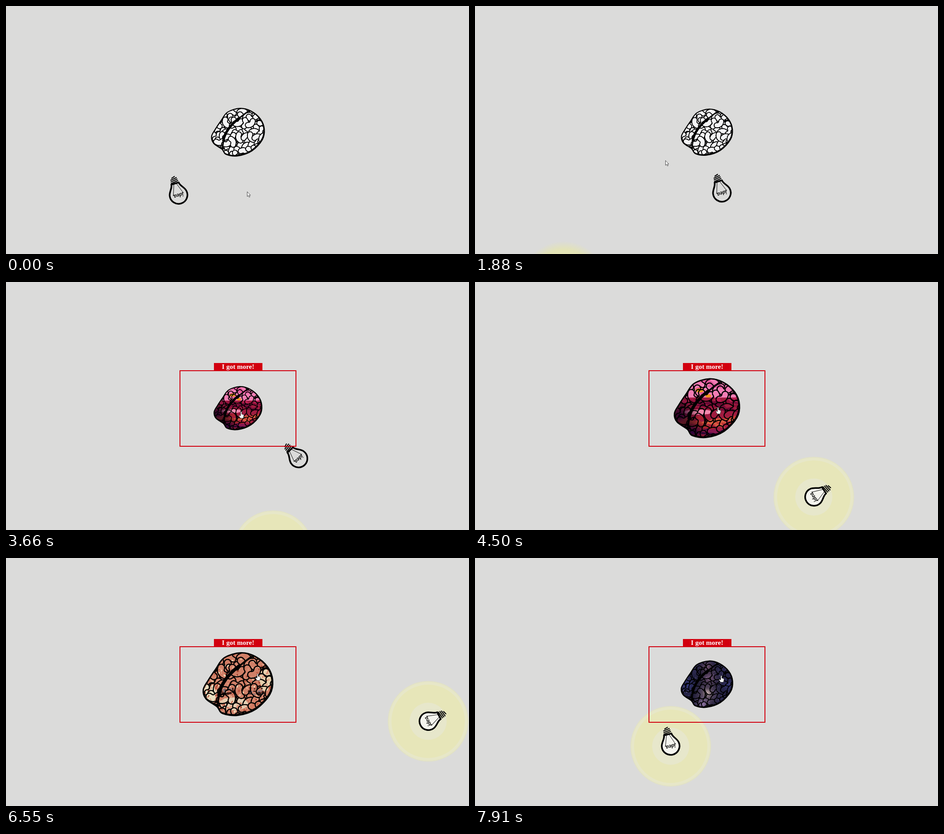
An HTML page with a canvas that plays this animation: 1022x548 px, repeating every 8000 ms.

```html
<!DOCTYPE html>
<html lang="en">
<head>
<meta charset="utf-8">
<title>Brain and ideas</title>
<style>
html, body { margin: 0; width: 100%; height: 100%; overflow: hidden; background: #dbdbda; }
canvas { display: block; }
</style>
</head>
<body>
<canvas id="stage" width="1022" height="548"></canvas>
<script>
const LOOP = 8000, BEAT = 2000, PEAK = 555, CX = 512, CY = 279;
const RED = '#d2000f', BG = '#dbdbda';
const ctx = document.getElementById('stage').getContext('2d');

// One bulb leaves the brain at each peak; velocity in px/ms, lit = age when it lights up
const BULBS = [
  { born: -1330, vx: -0.0984, vy: 0.1045, lit: 1900 },
  { born: PEAK, vx: 0.025, vy: 0.1013, lit: 1800 },
  { born: PEAK + BEAT, vx: 0.1212, vy: 0.1008, lit: 1850 },
  { born: PEAK + 2 * BEAT, vx: 0.2103, vy: 0.041, lit: 1000 },
  { born: PEAK + 3 * BEAT, vx: -0.059, vy: 0.101, lit: 1000 }
];

const POINTER = [[0, 532, 410], [1880, 420, 341], [2880, 503, 294], [4500, 536, 276],
  [5680, 611, 243], [6550, 555, 255], [8000, 543, 259]];
const HOVERS = [[2450, 5100], [6150, LOOP]];

// Brain outline at full size, relative to its centre
const OUTLINE = [[6, -69], [38, -61], [65, -38], [76, -9], [70, 22], [40, 54], [0, 68], [-34, 64],
  [-46, 49], [-70, 32], [-76, 12], [-65, -9], [-49, -33], [-30, -58]];
const FULL_WIDTH = 153;

function seeded(seed) {
  return () => {
    seed = (seed * 1664525 + 1013904223) >>> 0;
    return seed / 4294967296;
  };
}

function smoothLoop(points) {
  const path = new Path2D(), n = points.length;
  path.moveTo(...points[0]);
  for (let i = 0; i < n; i++) {
    const [p, a, b, q] = [n - 1, 0, 1, 2].map(k => points[(i + k) % n]);
    path.bezierCurveTo(a[0] + (b[0] - p[0]) / 6, a[1] + (b[1] - p[1]) / 6,
      b[0] - (q[0] - a[0]) / 6, b[1] - (q[1] - a[1]) / 6, b[0], b[1]);
  }
  return path;
}

function blob(g, x, y, rx, ry, color, turn = 0) {
  g.fillStyle = color;
  g.beginPath();
  g.ellipse(x, y, rx, ry, turn, 0, 7);
  g.fill();
}

function haze(g, x, y, r, color) {
  const grad = g.createRadialGradient(x, y, 0, x, y, r);
  grad.addColorStop(0, color);
  grad.addColorStop(1, 'rgba(0,0,0,0)');
  g.fillStyle = grad;
  g.fillRect(x - r, y - r, 2 * r, 2 * r);
}

// Off-screen layer with the brain centre at its middle, at double resolution
function layer(paint, base) {
  const c = document.createElement('canvas');
  c.width = 340;
  c.height = 300;
  const g = c.getContext('2d');
  g.scale(2, 2);
  g.translate(85, 75);
  if (base) {
    g.fillStyle = base;
    g.fillRect(-85, -75, 170, 150);
  }
  paint(g);
  return c;
}

const anywhere = rnd => [(rnd() - 0.5) * 160, (rnd() - 0.5) * 144];
const shell = smoothLoop(OUTLINE);
const fissure = new Path2D('M29-60C-10-32-46-2-44 52');
const fissureCore = new Path2D('M2-40C-20-22-38-2-42 24');

// Folds: short bent tubes overlapping like scales, each erasing the lines beneath it
const folds = layer(g => {
  const rnd = seeded(8), cols = 10, rows = 11, n = cols * rows;
  g.lineCap = 'round';
  for (let i = 0; i < n; i++) {
    const k = i * 37 % n, row = Math.floor(k / cols);
    const x = (k % cols - 4.5) * 17 + row % 2 * 8 + (rnd() - 0.5) * 7;
    const y = (row - 5) * 14 + (rnd() - 0.5) * 6;
    const a = -0.9 + (rnd() - 0.5) * 2.6, dx = Math.cos(a) * 9, dy = Math.sin(a) * 9;
    const bend = rnd() < 0.5 ? -0.9 : 0.9;
    const tube = new Path2D();
    tube.moveTo(x - dx, y - dy);
    tube.quadraticCurveTo(x - dy * bend, y + dx * bend, x + dx, y + dy);
    g.lineWidth = 17.5;
    g.globalCompositeOperation = 'source-over';
    g.stroke(tube);
    g.lineWidth = 12.5;
    g.globalCompositeOperation = 'destination-out';
    g.stroke(tube);
  }
});

const plain = layer(() => {}, '#f5f5f6');

const meat = layer(g => {
  const rnd = seeded(11), tones = ['#c05a44', '#e4a88c', '#a84834', '#ecd6b4', '#d67a60', '#dd9078'];
  blob(g, -62, 21, 14, 22, '#e8dfc0');
  blob(g, 60, -9, 14, 24, '#e6cfac');
  blob(g, -10, 43, 32, 14, '#e5cfb4');
  for (let i = 0; i < 500; i++)
    blob(g, ...anywhere(rnd), 0.8 + rnd() * 3, 0.6 + rnd() * 2, tones[i % 6], rnd() * 3);
  for (let i = 0; i < 44; i++)
    blob(g, (i % 2 ? -24 : 40) + (rnd() - 0.5) * 34, 15 + (rnd() - 0.5) * 14,
      1 + rnd() * 4, 1 + rnd() * 2, i % 3 ? '#3c1c18' : '#77717e');
}, '#d08068');

const facets = layer(g => {
  const rnd = seeded(5);
  const band = (top, bottom, ...colors) => {
    for (let i = 0; i < 26; i++) {
      const x = (rnd() - 0.5) * 165, y = top + rnd() * (bottom - top), w = 10 + rnd() * 22;
      g.fillStyle = colors[i % colors.length];
      g.beginPath();
      g.moveTo(x - w, y);
      g.lineTo(x + w * 0.3, y - 7);
      g.lineTo(x + w, y + 5);
      g.fill();
    }
  };
  g.fillStyle = '#f27db4';
  g.fillRect(-85, -75, 170, 50);
  band(-67, -33, '#f78cc0', '#f27db4', '#e0559a');
  band(-21, 5, '#8c1038', '#b81f52', '#6c0a34');
  band(21, 49, '#c43a34', '#d95c40', '#a8222e');
  band(53, 71, '#4a0a44', '#8a1850', '#36083a');
  blob(g, -20, 9, 34, 6, '#f58aae');
  blob(g, -17, -42, 10, 5, '#f5a01c');
  blob(g, 3, -29, 7, 4, '#f2961e');
  haze(g, -64, 17, 46, 'rgba(36,0,44,0.95)');
  haze(g, -34, 55, 34, 'rgba(50,4,60,0.9)');
}, '#a01c40');

const space = layer(g => {
  const rnd = seeded(23);
  haze(g, -57, 1, 45, 'rgba(58,64,140,0.8)');
  haze(g, 63, 3, 36, 'rgba(62,64,138,0.7)');
  haze(g, 0, -51, 32, 'rgba(160,114,150,0.9)');
  haze(g, 6, -17, 44, 'rgba(140,102,138,0.9)');
  haze(g, 0, 29, 48, 'rgba(196,160,196,0.95)');
  haze(g, 1, 27, 22, 'rgba(246,220,214,0.95)');
  haze(g, -12, 59, 42, 'rgba(170,138,190,0.8)');
  for (let i = 0; i < 170; i++) {
    const r = 0.3 + rnd() * 0.6;
    blob(g, ...anywhere(rnd), r, r, i % 3 ? '#9690c4' : '#e6d4e4');
  }
}, '#2b284e');

// The picture inside the brain changes when a beat is at its smallest
function skinAt(t, hover) {
  if (!hover) return plain;
  const beat = Math.floor((t + 420) / BEAT);
  return beat === 2 ? facets : beat === 4 ? space : meat;
}

// Steady swell with a sharp kick at the peak
function brainWidth(t) {
  const u = ((t - PEAK + BEAT) % BEAT) / BEAT;
  const v = Math.abs(u - 0.52) / (u > 0.52 ? 0.48 : 0.52);
  return 104 + 31 * v + 20 * v ** 10;
}

function drawBrain(t, hover) {
  const s = brainWidth(t) / FULL_WIDTH;
  ctx.save();
  ctx.translate(CX, CY);
  ctx.scale(s, s);
  ctx.lineJoin = ctx.lineCap = 'round';
  ctx.strokeStyle = '#000';
  ctx.save();
  ctx.clip(shell);
  for (const img of [skinAt(t, hover), folds]) ctx.drawImage(img, -85, -75, 170, 150);
  ctx.lineWidth = 4;
  ctx.stroke(fissure);
  ctx.lineWidth = 7;
  ctx.stroke(fissureCore);
  // heavier rim at the lower right
  ctx.translate(-1, -1);
  ctx.lineWidth = 4;
  ctx.stroke(shell);
  ctx.restore();
  ctx.lineWidth = 3;
  ctx.stroke(shell);
  ctx.restore();
}

function drawGlow(x, y, hover) {
  if (hover) {
    blob(ctx, x, y, 89, 89, '#e2e2c6');
    blob(ctx, x, y, 87, 87, '#e7e7c8');
    blob(ctx, x, y, 81, 81, '#e7e6b9');
    blob(ctx, x, y, 41, 41, '#e7e7cb');
    return;
  }
  const g = ctx.createRadialGradient(x, y, 0, x, y, 95);
  g.addColorStop(0, '#f6f6ee');
  g.addColorStop(0.28, '#efefd6');
  g.addColorStop(0.55, '#e8e8b6');
  g.addColorStop(0.8, '#e3e3b6');
  g.addColorStop(1, BG);
  blob(ctx, x, y, 95, 95, g);
}

const glass = new Path2D('M-8.5 27C-8.5 19-18 13-19.3 4A19.6 19.6 0 1 1 19.3 4C18 13 8.5 19 8.5 27Z');

function line(x0, y0, x1, y1, w) {
  ctx.lineWidth = w;
  ctx.beginPath();
  ctx.moveTo(x0, y0);
  ctx.lineTo(x1, y1);
  ctx.stroke();
}

function drawBulb(b, t, hover) {
  const age = t - b.born;
  if (age < 0) return;
  const x = CX + b.vx * age, y = CY + b.vy * age, lit = age > b.lit;
  if (lit) drawGlow(x, y, hover);
  ctx.save();
  ctx.translate(x, y);
  ctx.rotate((age * 0.12 + 3) * Math.PI / 180);
  ctx.lineJoin = ctx.lineCap = 'round';
  ctx.strokeStyle = '#000';
  ctx.fillStyle = lit ? '#f4f4ee' : BG;
  ctx.fill(glass);
  ctx.lineWidth = 3.6;
  ctx.stroke(glass);
  for (const side of [-1, 1]) {
    line(side * 3, 26, side * 11.5, 2, 0.9);
    line(side * 11.5, 3, side * 9, 3, 1.2);
  }
  for (let i = 0; i < 4; i++) {
    const w = i < 3 ? 7.8 - i * 0.6 : 3.4;
    line(-w, 31.5 + i * 3.6, w, 29.5 + i * 3.6, 2.2);
  }
  ctx.fillStyle = '#000';
  ctx.font = 'italic 700 12px Lato, sans-serif';
  ctx.textAlign = 'center';
  ctx.fillText('idea', 0, 3.5);
  ctx.restore();
}

function drawFrame() {
  ctx.strokeStyle = ctx.fillStyle = RED;
  ctx.lineWidth = 2;
  ctx.strokeRect(384, 196, 256, 167);
  ctx.fillRect(459, 179, 107, 17);
  ctx.fillStyle = '#fff';
  ctx.font = 'bold 15px "Liberation Serif", serif';
  ctx.textAlign = 'center';
  ctx.fillText('I got more!', 512.3, 192);
}

const arrow = new Path2D('M0 0V10.5L2.5 8.3L4.2 12L6 11.2L4.3 7.6H7.2Z');
const hand = new Path2D('M-1.3 1.2Q0 -.8 1.3 1.2V6L5 7Q6.2 7.4 6 9.5L4.8 15H-1.8L-5 9.6Q-4.6 7.6-2.8 9L-1.3 10Z');

function drawPointer(t, hover) {
  const i = POINTER.findIndex(p => p[0] > t), a = POINTER[i - 1], b = POINTER[i];
  const u = (t - a[0]) / (b[0] - a[0]), e = u * u * (3 - 2 * u);
  const shape = hover ? hand : arrow;
  ctx.save();
  ctx.translate(a[1] + (b[1] - a[1]) * e + 0.5, a[2] + (b[2] - a[2]) * e + 0.5);
  ctx.lineWidth = 0.8;
  ctx.fillStyle = '#fff';
  ctx.strokeStyle = '#222';
  ctx.fill(shape);
  ctx.stroke(shape);
  ctx.restore();
}

function render(t) {
  const hover = HOVERS.some(([a, b]) => t >= a && t < b);
  ctx.fillStyle = BG;
  ctx.fillRect(0, 0, 1022, 548);
  for (const b of BULBS) drawBulb(b, t, hover);
  drawBrain(t, hover);
  if (hover) drawFrame();
  drawPointer(t, hover);
}

const start = performance.now();
function tick() {
  render((performance.now() - start) % LOOP);
  requestAnimationFrame(tick);
}
tick();
</script>
</body>
</html>
```
